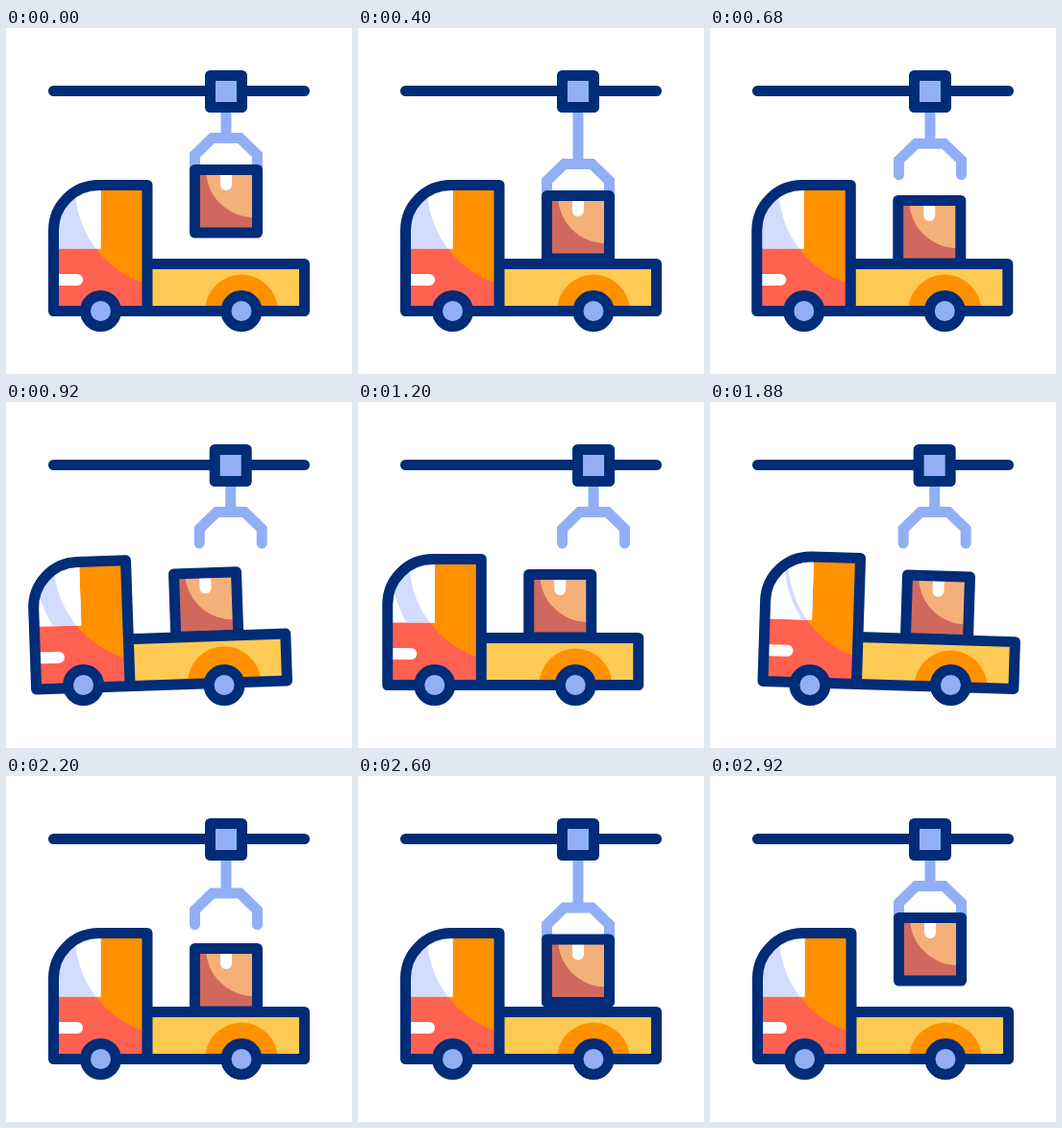
Write an HTML page that moves like this. It is 360x360 px and loops after 3 s.

```html
<!DOCTYPE html>
<html lang="en">
<head>
<meta charset="utf-8">
<title>Crane and truck</title>
<style>
  html, body { margin: 0; width: 100%; height: 100%; overflow: hidden; background: #fff; }
  svg { display: block; width: 100vw; height: 100vh; }
  .line { fill: none; stroke: #002c78; stroke-width: 11; stroke-linejoin: round; stroke-linecap: round; }
  .steel { fill: none; stroke: #92aff5; stroke-width: 11; }
  .wheel, .carriage { fill: #92aff5; stroke: #002c78; stroke-width: 11; stroke-linejoin: round; }
</style>
</head>
<body>
<svg viewBox="0 0 360 360">
  <defs>
    <clipPath id="cab"><path d="M49.500 294.500V210.500A47 47 0 0 1 96.500 163.500H147V294.500Z"/></clipPath>
    <clipPath id="window"><path d="M49 163H98.500V229.500H49Z"/></clipPath>
    <clipPath id="bed"><path d="M147 245.500H310.500V294.500H147Z"/></clipPath>
    <clipPath id="crate"><path d="M197 147.500H261.500V213H197Z"/></clipPath>
  </defs>

  <g id="trolley">
    <g id="claw">
      <path id="rod" class="steel" d="M229 80V114"/>
      <path class="steel" stroke-linecap="round" d="M196.500 147V132L214.500 114.500H243.500L261.500 132V147"/>
    </g>
  </g>
  <path class="line" d="M49.500 65.500H310.500"/>
  <rect id="carriage" class="carriage" x="212.500" y="49.500" width="33" height="33"/>

  <g id="truck">
    <g id="body">
      <g id="box">
        <g clip-path="url(#crate)">
          <path fill="#d0695d" d="M197 147H262V213H197Z"/>
          <circle cx="258" cy="147" r="50" fill="#f4b078"/>
          <path fill="#fff" d="M223 147H235V163A6 6 0 0 1 223 163Z"/>
        </g>
        <path class="line" d="M196.500 147.500H261.500V213H196.500Z"/>
      </g>
      <g clip-path="url(#bed)">
        <path fill="#ffca54" d="M147 245H311V295H147Z"/>
        <circle cx="245" cy="294.500" r="38" fill="#ff9100"/>
      </g>
      <g clip-path="url(#cab)">
        <path fill="#ff6250" d="M49 163H147V295H49Z"/>
        <circle cx="177" cy="166" r="105" fill="#ff9100"/>
        <g clip-path="url(#window)">
          <path fill="#fff" d="M49 163H99V230H49Z"/>
          <circle id="glare" cx="177" cy="166" r="165" fill="#d3dcff"/>
          <circle cx="177" cy="166" r="105" fill="#fff"/>
        </g>
        <path fill="#fff" d="M49 256H74A6 6 0 0 1 74 268H49Z"/>
      </g>
      <path class="line" d="M49.500 294.500V210.500A47 47 0 0 1 96.500 163.500H147V294.500M147 245.500H310.500V294.500H49.500"/>
    </g>
    <circle class="wheel" cx="98.500" cy="294.500" r="16"/>
    <circle class="wheel" cx="245" cy="294.500" r="16"/>
  </g>
</svg>
<script>
  const LOOP = 3000;
  const el = id => document.getElementById(id);
  const ease = p => p * p * (3 - 2 * p);

  // Eased value at time t through [time, value] keys.
  function track(keys, t) {
    if (t <= keys[0][0]) return keys[0][1];
    for (let i = 1; i < keys.length; i++) {
      const [t0, a] = keys[i - 1], [t1, b] = keys[i];
      if (t < t1) return a + (b - a) * ease((t - t0) / (t1 - t0));
    }
    return keys[keys.length - 1][1];
  }

  const DROP = 32;
  const clawY = [[40, 0], [520, DROP], [740, 0], [2100, 0], [2420, DROP], [2920, 0]];
  const boxY = [[40, 0], [520, DROP], [2420, DROP], [2920, 0]];
  const craneX = [[700, 0], [1400, 20], [2100, 0]];
  const truckX = [[640, 0], [1010, -21], [1140, -21], [1540, 15], [1620, 15], [2060, 0]];
  const tilt = [[740, 0], [900, -2], [1000, -2], [1140, 0], [1640, 0], [1840, 1.8], [1920, 1.8], [2080, 0]];
  const glare = [[700, 60], [900, 20], [1200, 20], [1440, 12], [1880, 4], [2160, 60]];

  const move = (id, x, y) => el(id).setAttribute("transform", `translate(${x} ${y})`);

  function draw(t) {
    const x = track(craneX, t), y = track(clawY, t);
    move("trolley", x, 0);
    move("carriage", x, 0);
    move("claw", 0, y);
    el("rod").setAttribute("d", `M229 ${80 - y}V114`);
    move("box", 0, track(boxY, t));
    move("truck", track(truckX, t), 0);
    el("body").setAttribute("transform", `rotate(${track(tilt, t)} 180 294.500)`);
    el("glare").setAttribute("r", 105 + track(glare, t));
  }

  const start = performance.now();
  function tick() {
    draw((performance.now() - start) % LOOP);
    requestAnimationFrame(tick);
  }
  tick();
</script>
</body>
</html>
```
